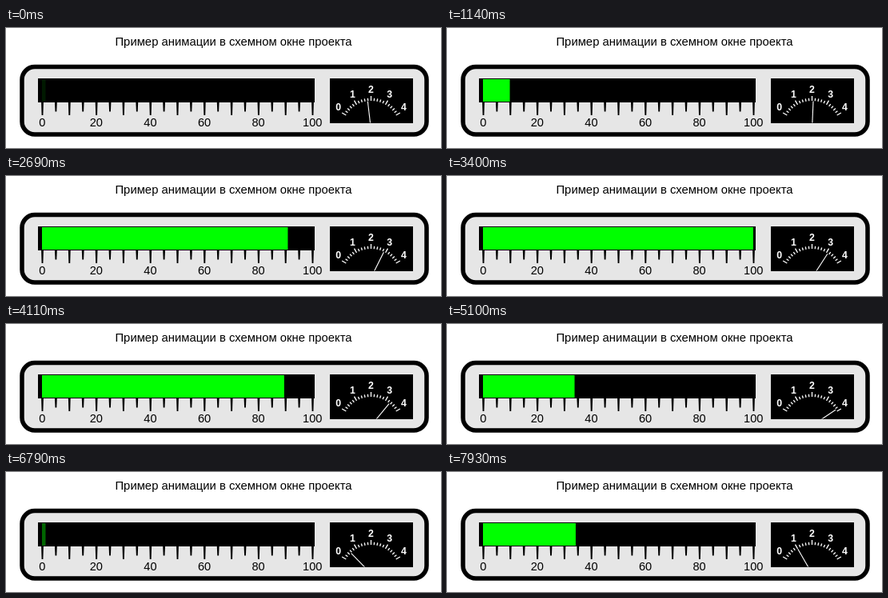
An HTML page that plays this animation: 544 by 150 pixels, repeating every 8000 ms.

```html
<!DOCTYPE html>
<html lang="ru">
<head>
<meta charset="utf-8">
<style>
html, body { margin: 0; width: 100%; height: 100%; overflow: hidden; background: #fff; }
svg { display: block; }
text { font-family: "Liberation Sans", Arial, sans-serif; text-anchor: middle; }
.title { font-size: 14.85px; }
.scale { font-size: 14.6px; }
.dial { font-size: 12.3px; font-weight: bold; fill: #fff; }
</style>
</head>
<body>
<svg id="stage" width="544" height="150" viewBox="0 0 544 150">
  <clipPath id="window"><rect x="405" y="63" width="104" height="55.5"/></clipPath>
  <text class="title" x="284.5" y="22">Пример анимации в схемном окне проекта</text>
  <rect x="20" y="48.5" width="506" height="84.5" rx="16" fill="#e6e6e6" stroke="#000" stroke-width="5.5"/>
  <rect x="40" y="63" width="346" height="30"/>
  <rect id="bar" x="45" y="64" height="28"/>
  <g id="ruler"></g>
  <rect x="405" y="63" width="104" height="56"/>
  <g id="dial" stroke="#fff" clip-path="url(#window)"></g>
  <g id="numbers"></g>
</svg>
<script>
const LOOP = 8000, FIRST = 430, STEP = 141.5;
const PIVOT = { x: 456.5, y: 127 };
const UNIT = 3.38;

// update count, bar phase (deg, 0 = full), unwrapped needle angle (deg)
const KEYS = [
  [0, -186, -6.7], [11, -92, 13.4], [16, -35, 26.6], [26, 37.6, 39.5],
  [32, 108.8, 56.3], [44, 192, 75.7], [52, 251.7, 90]
];

const $ = id => document.getElementById(id);

function add(parent, tag, attrs, content = '') {
  const node = document.createElementNS('http://www.w3.org/2000/svg', tag);
  for (const name in attrs) node.setAttribute(name, attrs[name]);
  node.textContent = content;
  parent.append(node);
  return node;
}

function polar(radius, degrees) {
  const a = degrees * Math.PI / 180;
  return [PIVOT.x + radius * Math.sin(a), PIVOT.y - radius * Math.cos(a)];
}

function ray(inner, outer, degrees, width) {
  const [x1, y1] = polar(inner, degrees), [x2, y2] = polar(outer, degrees);
  return add($('dial'), 'line', { x1, y1, x2, y2, 'stroke-width': width });
}

for (let v = 0; v <= 100; v += 5) {
  const x = 45.5 + v * UNIT, length = v % 10 === 0 ? 16 : 11.5;
  add($('ruler'), 'path', { d: `M${x - 1.4} 93h2.8l-.5 ${length}h-1.8z` });
  if (v % 20 === 0) add($('stage'), 'text', { class: 'scale', x: x - 0.3, y: 123 }, v);
}

for (let i = 0; i <= 20; i++) {
  const major = i % 5 === 0;
  ray(36, major ? 42 : 39.5, i * 6 - 60, 1.3);
  if (major) {
    const [x, y] = polar(49.5, (i * 6 - 60) * 0.93);
    add($('numbers'), 'text', { class: 'dial', x, y: y + 3.5 }, i / 5);
  }
}

const needle = ray(0, 35.5, 0, 1.1);

function updatesAt(time) {
  const slot = Math.floor((time + 8 - FIRST) / STEP);
  // two slots repeat the previous picture
  return Math.max(0, slot + 1 - (slot >= 2) - (slot >= 28));
}

function poseAt(count) {
  const next = Math.max(1, KEYS.findIndex(key => key[0] >= count));
  const a = KEYS[next - 1], b = KEYS[next];
  const t = (count - a[0]) / (b[0] - a[0]);
  return [1, 2].map(i => a[i] + (b[i] - a[i]) * t);
}

function render(time) {
  const [phase, angle] = poseAt(updatesAt(time));
  const value = 50 + 50 * Math.cos(phase * Math.PI / 180);
  const green = Math.round(255 * Math.min(1, value / 2.75));
  $('bar').setAttribute('width', Math.max(4.5, value * UNIT));
  $('bar').setAttribute('fill', `rgb(0,${green},0)`);
  const turn = angle >= 60 ? angle - 120 : angle;
  needle.setAttribute('transform', `rotate(${turn} ${PIVOT.x} ${PIVOT.y})`);
}

function tick() {
  render(performance.now() % LOOP);
  requestAnimationFrame(tick);
}
tick();
</script>
</body>
</html>
```
